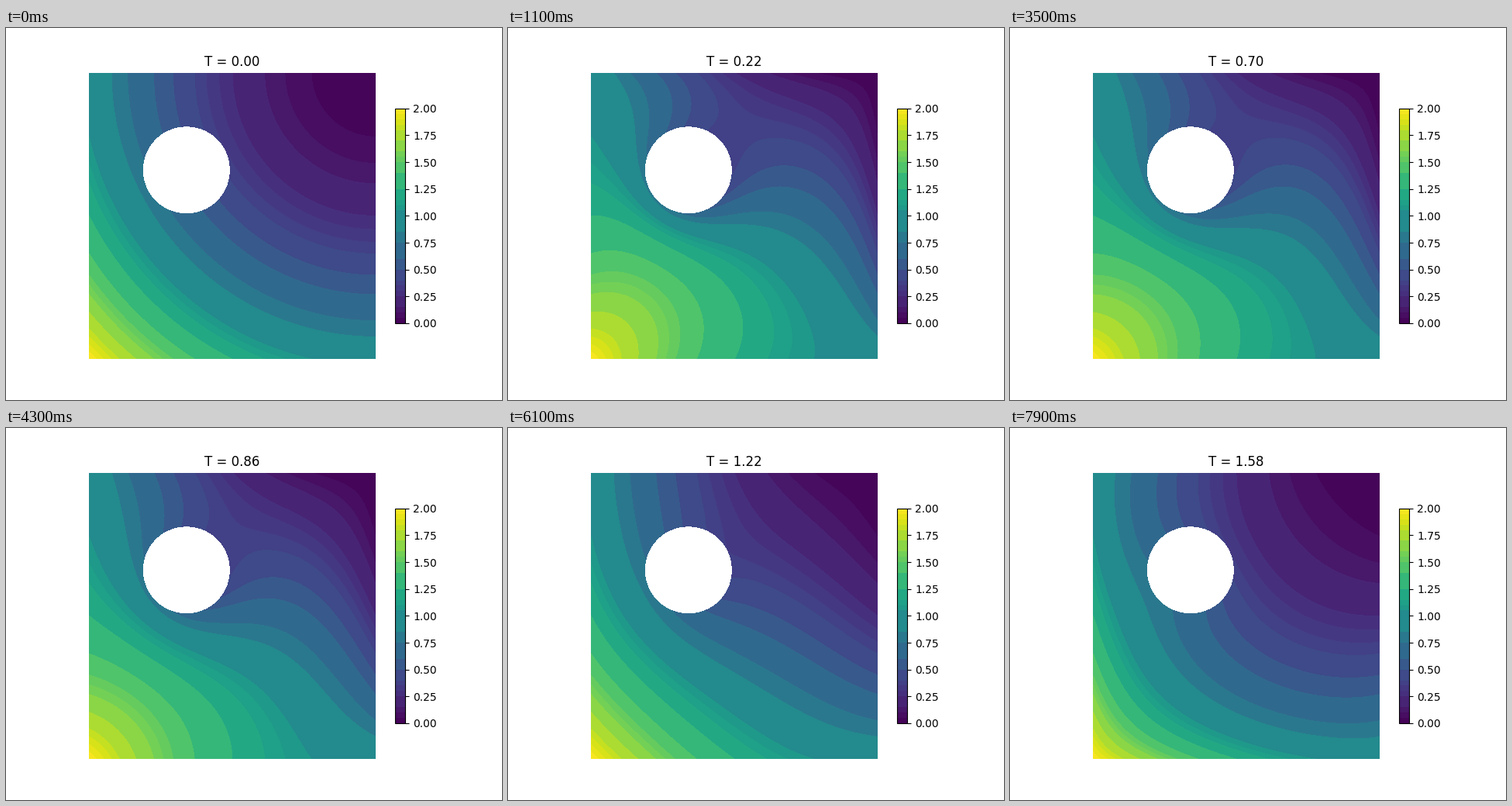
A matplotlib script that plays this animation: 640 px wide and 480 px high, repeating every 8000 ms.

```python
import numpy as np
import matplotlib.pyplot as plt
from matplotlib.animation import FuncAnimation
from matplotlib.patches import Circle

FRAMES, INTERVAL = 80, 100
FRAME_DT, SUBSTEPS = 0.02, 200

# Advection-diffusion on the unit square around a round hole,
# driven by a diagonal wind that swings back and forth.
N = 101
H = 1 / (N - 1)
DT = FRAME_DT / SUBSTEPS
DIFFUSION, WIND, OMEGA = 0.2, 1.0, np.pi / 2
CX, CY, RADIUS = 0.34, 0.66, 0.15

axis = np.linspace(0, 1, N)
X, Y = np.meshgrid(axis, axis)
START = (X - 1) ** 2 + (Y - 1) ** 2
SLOPE = (2 * (X - 1) + 2 * (Y - 1))[1:-1, 1:-1]
DIST = np.hypot(X - CX, Y - CY)
FLUID = (DIST > RADIUS)[1:-1, 1:-1].astype(float)


def mirror_nodes():
    """Nodes just inside the hole, with bilinear weights of their mirror points."""
    ghost = np.flatnonzero((DIST <= RADIUS) & (DIST > RADIUS - 2.5 * H))
    r = DIST.ravel()[ghost]
    scale = (2 * RADIUS - r) / r
    gx = (CX + (X.ravel()[ghost] - CX) * scale) / H
    gy = (CY + (Y.ravel()[ghost] - CY) * scale) / H
    i, j = gx.astype(int), gy.astype(int)
    fx, fy = gx - i, gy - j
    k = j * N + i
    idx = np.array([k, k + 1, k + N, k + N + 1])
    wts = np.array([(1 - fx) * (1 - fy), fx * (1 - fy), (1 - fx) * fy, fx * fy])
    return ghost, idx, wts


def solve():
    """Field for every frame; v is the departure from the starting field."""
    ghost, idx, wts = mirror_nodes()
    v = np.zeros((N, N))
    flat = v.ravel()
    k = DIFFUSION * DT / H ** 2
    fields = []
    for frame in range(FRAMES):
        fields.append(np.clip(START + v, 0, 2))
        for sub in range(SUBSTEPS):
            t = frame * FRAME_DT + (sub + 0.5) * DT
            b = WIND * np.cos(OMEGA * t)
            e = b * DT / (2 * H)
            ahead = v[1:-1, 2:] + v[2:, 1:-1]
            behind = v[1:-1, :-2] + v[:-2, 1:-1]
            new = (1 - 4 * k) * v[1:-1, 1:-1] + (k - e) * ahead + (k + e) * behind
            new += DT * (4 * DIFFUSION - b * SLOPE)
            v[1:-1, 1:-1] = new * FLUID
            flat[ghost] = -(wts * flat[idx]).sum(axis=0)
    return fields


def band_colors(levels):
    """Viridis, with some neighbouring bands sharing one colour."""
    edges = [0, 1, 2, 3, 5, 6, 7, 8, 10, 12, 15, 17, 21, 22, 23, 25, 28,
             30, 31, 32, 34, 36, 37, 38, 39, 40]
    mids = (levels[:-1] + levels[1:]) / 2
    rgba = plt.get_cmap("viridis")(mids / 2)
    for a, z in zip(edges, edges[1:]):
        rgba[a:z] = rgba[a:z].mean(axis=0)
    return rgba


LEVELS = np.linspace(0, 2, 41)
COLORS = band_colors(LEVELS)
FIELDS = solve()

fig, ax = plt.subplots(figsize=(6.4, 4.8), dpi=100)
ax.set_aspect("equal")
ax.axis("off")


def fill(field):
    return ax.contourf(X, Y, field, levels=LEVELS, colors=COLORS)


bands = fill(FIELDS[0])
bar = fig.colorbar(bands, ax=ax, shrink=0.75, ticks=np.arange(0, 2.01, 0.25),
                   format="%.2f")
bar.minorticks_off()
ax.add_patch(Circle((CX, CY), RADIUS, fc="white", ec="none",
                    antialiased=False, zorder=2))
ax.set_xlim(0, 1)
ax.set_ylim(0, 1)
title = ax.set_title("T = 0.00")


def update(frame):
    global bands
    bands.remove()
    bands = fill(FIELDS[frame])
    title.set_text(f"T = {frame * FRAME_DT:.2f}")
    return []


anim = FuncAnimation(fig, update, frames=FRAMES, interval=INTERVAL,
                     init_func=lambda: [], repeat=True, repeat_delay=0)
plt.show()
```
